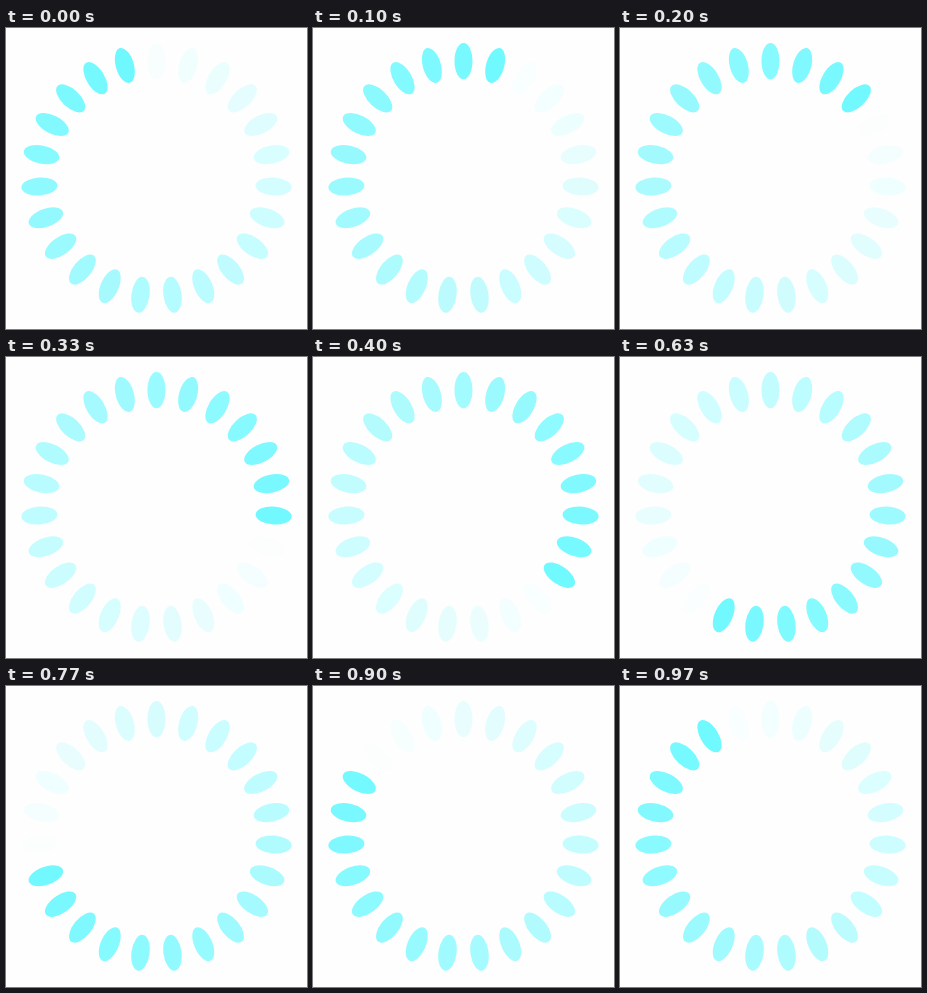
An HTML page for the animation above (1 s loop, 301 by 301 pixels).

```html
<!DOCTYPE html>
<html lang="en">
<head>
<meta charset="utf-8">
<title>Spinner</title>
<style>
  html, body { margin: 0; height: 100%; overflow: hidden; background: #fefefe; }
  svg { display: block; width: 100vw; height: 100vh; }
</style>
</head>
<body>
<svg viewBox="0 0 100 100" fill="#6ff9ff"></svg>
<script>
const COUNT = 23, PERIOD = 1000, FPS = 30;
const svg = document.querySelector('svg');

const petals = Array.from({ length: COUNT }, (_, i) => {
  const petal = document.createElementNS('http://www.w3.org/2000/svg', 'ellipse');
  const attrs = { cx: 50, cy: 11, rx: 3, ry: 6, transform: `rotate(${i * 360 / COUNT} 50 50)` };
  for (const name in attrs) petal.setAttribute(name, attrs[name]);
  return svg.appendChild(petal);
});

// Each petal fades linearly from 1 to 0, one after another around the ring.
function draw(ms) {
  // Steps start on 10 ms ticks, up to 3.4 ms before the exact 1/30 s.
  const step = Math.floor((ms % PERIOD + 3.4) * FPS / 1000) % FPS;
  petals.forEach((petal, i) => {
    const phase = (step / FPS + (COUNT - 1 - i) / COUNT) % 1;
    petal.setAttribute('opacity', 1 - phase);
  });
}

let start;
function tick(now) {
  start ??= now;
  draw(now - start);
  requestAnimationFrame(tick);
}
draw(0);
requestAnimationFrame(tick);
</script>
</body>
</html>
```
